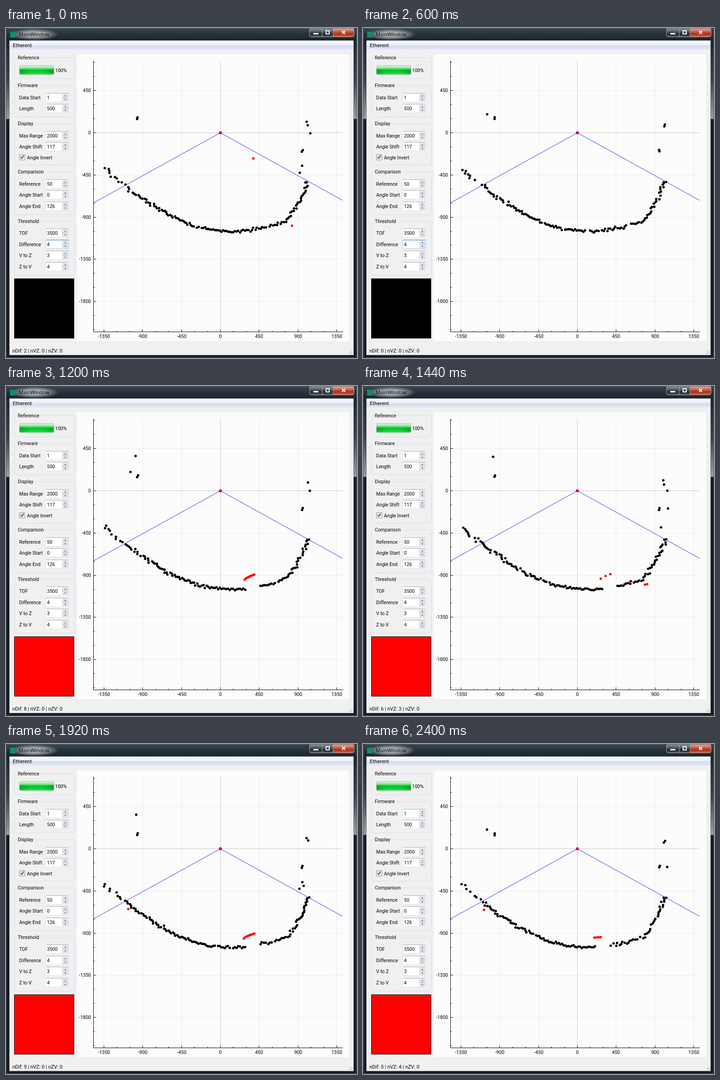
These frames come from a looping animation (772x726 px, 2520 ms). An HTML page with a canvas:

```html
<!DOCTYPE html>
<html lang="en">
<head>
<meta charset="utf-8">
<title>MainWindow</title>
<style>
html, body { margin: 0; width: 100%; height: 100%; overflow: hidden; background: #141c22; }
canvas { display: block; }
</style>
</head>
<body>
<canvas id="stage" width="772" height="726"></canvas>
<script>
const W = 772, H = 726, STEP = 120, COUNT = 21, ALARM = 10;
const UI = '10.5px Roboto, "Open Sans", sans-serif';
const screen = document.getElementById('stage').getContext('2d');
const chrome = document.createElement('canvas');
chrome.width = W;
chrome.height = H;
let g = chrome.getContext('2d');

// Sensor position and plot area
const CX = 471.5, CY = 230.5, L = 192, R = 740, T = 72, B = 668;

// Wall as angle in degrees (zero is straight down) and distance
const WALL = [[-73, 266], [-60, 238], [-48, 222], [-37, 214.5], [-25, 211.6],
  [0, 215], [20, 225], [37, 242], [44, 235], [60.5, 220]];

// Places that echo now and then: x, y, chance
const ECHOES = [[290, 196, 1], [289, 200, 1], [286, 155, .7], [273, 189, .5],
  [661, 207, .6], [664, 213, .8], [662, 217, .5], [669, 231, .4],
  [652, 268, 1], [651, 272, 1], [670, 270, .5], [652, 304, .6],
  [655, 311, .4], [646, 319, .5], [662, 339, .8], [667, 338, .8]];

// Marked echoes: an object seen as n dots between two ends, and single dots
const MARKS = [
  { from: 0, single: [[544, 287], [629, 435]] },
  { from: 1, single: [[628, 435]] },
  { from: 5, single: [] },
  { from: 8, run: [525, 426, 546, 415], n: 8, single: [] },
  { from: 12, run: [523, 424, 544, 414], n: 3, single: [[587, 431], [620, 437], [625, 436]] },
  { from: 15, run: [523, 428, 546, 417], n: 8, single: [[269, 363]] },
  { from: 18, run: [509, 426, 523, 425], n: 4, single: [[266, 365]] }
];

function random(seed) {
  let s = seed * 7919 + 17;
  return () => {
    s = (s + 0x6D2B79F5) | 0;
    let t = Math.imul(s ^ (s >>> 15), 1 | s);
    t = (t + Math.imul(t ^ (t >>> 7), 61 | t)) ^ t;
    return ((t ^ (t >>> 14)) >>> 0) / 4294967296;
  };
}

function rect(x, y, w, h, fill) {
  g.fillStyle = fill;
  g.fillRect(x, y, w, h);
}

function frame(x, y, w, h, stroke, r = 0) {
  g.strokeStyle = stroke;
  g.lineWidth = 1;
  g.beginPath();
  g.roundRect(x + .5, y + .5, w - 1, h - 1, r);
  g.stroke();
}

function line(x1, y1, x2, y2, color, width = 1) {
  g.strokeStyle = color;
  g.lineWidth = width;
  g.beginPath();
  g.moveTo(x1, y1);
  g.lineTo(x2, y2);
  g.stroke();
}

function fade(y1, y2, ...colors) {
  const f = g.createLinearGradient(0, y1, 0, y2);
  colors.forEach((c, i) => f.addColorStop(i / (colors.length - 1), c));
  return f;
}

function text(s, x, y, font = UI, align = 'left') {
  g.font = font;
  g.textAlign = align;
  g.fillStyle = '#000';
  g.fillText(s, x, y);
}

function dot(x, y, color, r = 2.7) {
  g.fillStyle = color;
  g.beginPath();
  g.arc(x, y, r, 0, Math.PI * 2);
  g.fill();
}

function drawTitle() {
  rect(1, 1, W - 2, 27, fade(1, 28, '#3a454d', '#26313a', '#1a242b'));

  // Soft light behind the title
  g.save();
  g.translate(62, 14);
  g.scale(1, .24);
  const glow = g.createRadialGradient(0, 0, 22, 0, 0, 54);
  glow.addColorStop(0, 'rgba(172,177,180,.95)');
  glow.addColorStop(1, 'rgba(172,177,180,0)');
  rect(-56, -54, 112, 108, glow);
  g.restore();

  rect(9, 8, 12, 13, '#168a70');
  text('MainWindow', 28, 18, '11.1px "Open Sans", "Noto Sans", sans-serif');

  rect(668, 1, 52, 18, fade(1, 19, '#8b9299', '#5c656c', '#232a30', '#4a535a'));
  rect(720, 1, 45, 18, fade(1, 19, '#e3a79b', '#cc6a58', '#ad2c16', '#d2664a'));
  frame(667, 0, 99, 20, '#a5abb0', 4);
  line(695.5, 1, 695.5, 19, '#a5abb0');
  line(719.5, 1, 719.5, 19, '#a5abb0');
  rect(676, 11, 11, 3, '#fff');
  g.strokeStyle = '#fff';
  g.lineWidth = 2;
  g.strokeRect(704, 6, 7, 7);
  line(739, 6, 746, 13, '#fff', 2.2);
  line(746, 6, 739, 13, '#fff', 2.2);
}

function drawWindow() {
  rect(0, 0, W, H, '#141c22');
  drawTitle();
  for (const x of [1, 765]) rect(x, 28, 6, 172, fade(28, 200, '#1c252c', '#3c4348', '#9a9fa3'));
  frame(0, 0, W, H, '#57656f', 6);
  frame(7, 27, 758, 693, '#7f8b93');

  rect(8, 28, 756, 691, '#f0f0f0');
  rect(8, 28, 756, 10, fade(28, 38, '#ffffff', '#e8ecf5'));
  rect(8, 38, 756, 9, fade(38, 47, '#d4dbed', '#e1e6f6'));
  text('Etherent', 15, 42, '11.2px Roboto, "Open Sans", sans-serif');
  for (let i = 0; i < 3; i++)
    for (let j = 0; j <= i; j++) rect(760 - j * 3, 709 + i * 3, 2, 2, '#c4c4c4');
}

function group(title, top, bottom) {
  frame(18, top, 133, bottom - top, '#d5dfe8', 3);
  g.font = UI;
  rect(24, top - 4, g.measureText(title).width + 4, 9, '#f0f0f0');
  text(title, 26, top + 4);
}

function arrow(x, y, d) {
  g.fillStyle = '#46618f';
  g.beginPath();
  g.moveTo(x - 2.5, y + d);
  g.lineTo(x + 2.5, y + d);
  g.lineTo(x, y - d * 1.5);
  g.fill();
}

function spin(label, value, y, focus) {
  text(label, 29, y + 4);
  rect(87, y - 10, 52, 20, '#fff');
  frame(87, y - 10, 52, 20, focus ? '#9fcbe8' : '#dde3ea', 1);
  rect(88, y - 10, 50, 1, focus ? '#3d7bad' : '#abadb3');
  for (const d of [1, -1]) {
    const top = d > 0 ? y - 8 : y;
    rect(124, top, 13, 8, fade(top, top + 8, '#f5f5f5', '#dfe0e2'));
    frame(124, top, 13, 8, '#c3c6ca', 1);
    arrow(130.5, top + 4, d);
  }
  text(value, 90, y + 4);
}

function drawProgress() {
  rect(30, 83, 75, 19, fade(83, 102, '#e2f6e4', '#8fe59a', '#06c62c', '#08cf2c', '#3fdd56'));
  const edge = g.createLinearGradient(30, 0, 105, 0);
  ['rgba(0,120,20,.45)', 'rgba(0,160,30,0)', 'rgba(0,160,30,0)', 'rgba(0,120,20,.45)']
    .forEach((c, i) => edge.addColorStop(i / 3, c));
  rect(30, 91, 75, 10, edge);
  frame(29, 82, 77, 21, '#b4bab5', 2);
  text('100%', 108, 97);
}

function drawPanel() {
  group('Reference', 65, 112);
  drawProgress();

  group('Firmware', 126, 196);
  spin('Data Start', '1', 153);
  spin('Length', '500', 177);

  group('Display', 210, 302);
  spin('Max Range', '2000', 237);
  spin('Angle Shift', '117', 261);
  rect(29, 278, 13, 13, '#f4f4f4');
  frame(29, 278, 13, 13, '#8e8f8f');
  rect(31, 280, 9, 9, fade(280, 289, '#d2d8de', '#f5f6f7'));
  line(32, 284, 34.7, 287.5, '#3f568f', 2);
  line(34.3, 287.5, 39, 280.5, '#3f568f', 2);
  text('Angle Invert', 46, 289);

  group('Comparison', 316, 411);
  spin('Reference', '50', 343);
  spin('Angle Start', '0', 367);
  spin('Angle End', '126', 392);

  group('Threshold', 425, 544);
  spin('TOF', '3500', 451);
  spin('V to Z', '3', 500);
  spin('Z to V', '4', 525);
}

// Calls mark(position, label, major) for every tick, three per labelled step
function eachTick(zero, gap, low, high, mark) {
  for (let i = -15; i <= 15; i++) {
    const p = Math.floor(zero + i * gap) + .5;
    if (p > low && p < high) mark(p, i * 150, i % 3 === 0);
  }
}

function gridLine(x1, y1, x2, y2, dashed) {
  g.setLineDash(dashed ? [1, 2] : []);
  line(x1, y1, x2, y2, '#c8c8c8');
  g.setLineDash([]);
}

function drawAxes() {
  rect(156, 58, 599, 631, '#fcfcfc');
  eachTick(CX, 85.35 / 3, L, R, (x, value, major) => {
    if (major) {
      gridLine(x, T, x, B, value);
      text(value, x, 682, UI, 'center');
    }
    line(x, B, x, B - (major ? 5 : 2), '#000');
  });
  eachTick(CY, 92.8 / 3, T, B, (y, value, major) => {
    if (major) {
      gridLine(L, y, R, y, value);
      text(-value, 187, y + 3.5, UI, 'right');
    }
    line(L, y, L + (major ? 6 : 3), y, '#000');
  });
  line(L + .5, T, L + .5, B + 1, '#000');
  line(L, B + .5, R + 1, B + .5, '#000');
  line(CX, CY, L, 385, '#2a2aff');
  line(CX, CY, R, 379, '#2a2aff');
}

function range(a) {
  const i = Math.max(1, WALL.findIndex(p => p[0] >= a));
  const [a0, r0] = WALL[i - 1], [a1, r1] = WALL[i];
  return r0 + (r1 - r0) * (a - a0) / (a1 - a0);
}

// One ray per degree; the object hides the wall behind it
function drawWall(rnd, shadow) {
  for (let a = -73; a <= 60.5; a += 122 / 126) {
    const noise = (rnd() + rnd() - 1) * (3.5 + Math.abs(a) / 20);
    const seen = rnd() < (a < -61 ? .6 : .95);
    const t = a * Math.PI / 180, r = range(a) + noise;
    const x = CX + Math.sin(t) * r, y = CY + Math.cos(t) * r;
    if (seen && !(x > shadow + 3 && x < shadow + 34)) dot(x, y, '#000');
  }
}

function drawScan(k) {
  const rnd = random(k + 1);
  const { run, n = 0, single } = MARKS.filter(m => m.from <= k).pop();
  drawWall(rnd, run ? run[0] : W);
  for (const [x, y, chance] of ECHOES) {
    const dx = rnd() * 2 - 1, dy = rnd() * 2 - 1;
    if (rnd() < chance) dot(x + dx, y + dy, '#000');
  }
  for (let i = 0; i < n; i++) {
    const u = i / (n - 1), [x0, y0, x1, y1] = run;
    dot(x0 + (x1 - x0) * u, y0 + (y1 - y0) * Math.pow(u, .7), '#f00');
  }
  for (const [x, y] of single) dot(x, y, '#f00');
  dot(CX, CY, '#3a20d0', 3.2);
  dot(CX, CY, '#e8001c', 2.8);
  return n + single.length;
}

// Scans in a row that call for a change of state
function streak(k) {
  if (k < 8) return 0;
  if (k < ALARM) return k - 7;
  return k < 16 ? Math.floor((k - ALARM) * 1.5) : k - 16;
}

function draw(k) {
  const alarm = k >= ALARM;
  g.drawImage(chrome, 0, 0);
  spin('Difference', '4', 476, !alarm);
  if (!alarm && k % 6 >= 1 && k % 6 <= 3) rect(96, 470, 1, 12, '#000');
  rect(18, 551, 132, 132, alarm ? '#f00' : '#000');
  frame(18, 551, 132, 132, '#000');
  const marked = drawScan(k);
  text(`nDif: ${marked} | nVZ: ${streak(k)} | nZV: 0`, 14, 714, '11px Roboto, "Open Sans", sans-serif');
}

drawWindow();
drawPanel();
drawAxes();
g = screen;

const start = performance.now();
let last = -1;
function tick() {
  const k = Math.floor((performance.now() - start) / STEP) % COUNT;
  if (k !== last) draw(last = k);
  requestAnimationFrame(tick);
}
tick();
</script>
</body>
</html>
```
